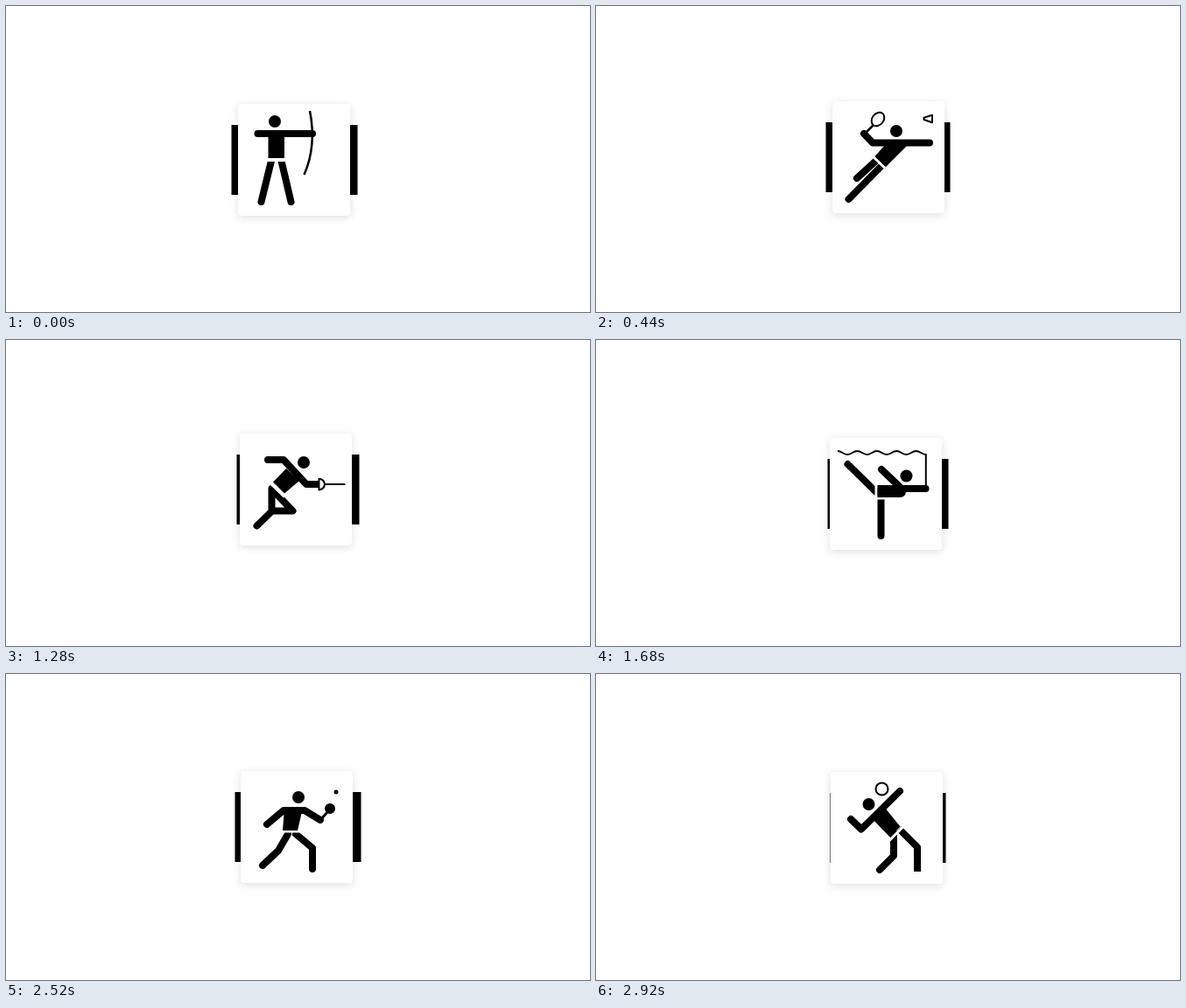
Recreate the animation shown at these times as an HTML page. Size 667x350 px, loop 3.32 s.

```html
<!DOCTYPE html>
<html lang="en">
<head>
<meta charset="utf-8">
<title>Sport pictograms</title>
<style>
  html, body { margin: 0; width: 100%; height: 100%; overflow: hidden; background: #fff; }
  svg { display: block; width: 100%; height: 100%; }
  #card { fill: #fff; filter: drop-shadow(0 2px 5px rgba(0, 0, 0, .13)); }
  #icon { stroke-linejoin: round; }
</style>
</head>
<body>
<svg viewBox="0 0 667 350">
  <rect id="bar" height="80"/>
  <rect id="card" width="128" height="128" rx="4"/>
  <g id="icon"></g>
</svg>
<script>
const line = (d, w = 8, cap = 'round', color = '#000') =>
  `<path d="${d}" fill="none" stroke="${color}" stroke-width="${w}" stroke-linecap="${cap}"/>`;
const thin = (d, w = 2) => line(d, w, 'butt');
const cut = (d, w = 3) => line(d, w, 'butt', '#fff');
const shape = d => `<path d="${d}Z"/>`;
const dot = (x, y, r = 7) => `<circle cx="${x}" cy="${y}" r="${r}"/>`;
const ring = (x, y, rx, ry = rx, turn = 0) =>
  `<ellipse cx="${x}" cy="${y}" rx="${rx}" ry="${ry}" transform="rotate(${turn} ${x} ${y})" fill="none" stroke="#000" stroke-width="2"/>`;

// Ribbon: alternating half waves, then the drop to the hand
function ribbon() {
  let d = 'M276 127';
  for (let i = 0; i < 9; i++) {
    const y = i % 2 ? -4 : 4;
    d += `c5 0 6.2 ${y} 11.2 ${y}`;
  }
  return thin(d) + thin('M376.8 130V168');
}

const archery =
  line('M304 173L291.5 224M313.5 173L325.5 224') + cut('M294 176H324', 4) +
  shape('M299.5 146H318V174H299.5') + line('M287.5 146H350') +
  dot(307, 132) + thin('M347 120Q355 160 340.5 193', 2.5);

const badminton =
  line('M322 175L298 197M327 182L288.5 221') + cut('M312 167.8L334 189.2') +
  shape('M330 159H356L331 184L318.5 172') + line('M306 146L316 156.5H381') +
  dot(343, 143) + ring(322, 129.5, 6.5, 8.5, 38) + thin('M317 136L306 147', 2.5) +
  thin('M384 124.8V133.2L374.5 130V127.6Z');

const basketball =
  line('M321 181L307 198L288 216M327 181L342 198L337 224') + cut('M310 178H340') +
  shape('M316 153H335L332 177H316') + line('M296 168L314 156H336L359 143') +
  dot(328, 141) + ring(364, 132, 6);

const fencing =
  line('M303.5 170V196L286.5 212.5M304 171L327.5 195.5H303.5') + cut('M299 161L318 179.5') +
  shape('M320 147L335 161L318 175.5L305 162.5') + line('M299 137H317L343 165H356') +
  dot(340, 140) +
  '<path d="M357.5 158.8V171.5C366 170 366 160 357.5 158.8Z" fill="#fff" stroke="#000" stroke-width="2"/>' +
  thin('M363 165H387.5');

const gymnastics =
  ribbon() + line('M287.5 142L320 174') + cut('M320 163V184') +
  line('M325.5 181V224') + cut('M319 181H332') +
  shape('M321.5 166H346L354 172Q354 180 347 180H321.5') +
  line('M326 148L349 170H376.5') + dot(354.5, 155.5);

const skateboard =
  line('M305 171L324.5 189V213.5M306 173H332L349.5 190') + cut('M298 167H338', 4) +
  shape('M321 145L338 156L328 165H302') + line('M302 132.5H321L347 160.5H363') +
  dot(342, 137) +
  thin('M323 221.5Q329 222.5 333 218.5L356 195.5Q360 191 359 186') +
  dot(337, 221, 2) + dot(358, 200, 2);

const tableTennis =
  line('M322 183L311 202L293 219M331 183L350 199V223') + cut('M310 180H343') +
  shape('M318 153H339L333 179H316') + line('M298 172L317 156H341L359 167') +
  dot(334, 141) + thin('M359 167L367 158', 3) + dot(370, 154, 6) + dot(377, 135, 2.5);

const volleyball =
  line('M340 182V208L324 224') + line('M346 177L367 198V226', 8, 'butt') +
  cut('M333 192.5L352 173.5') +
  shape('M316 166L330 153L347.5 174.5L335.5 186.5') + line('M291 166L303 177.5L347 134') +
  dot(311.5, 149) + ring(326.5, 131.5, 7);

// start time, card x and y, left and right end of the bar
const steps = [
  [0, 265, 112, 257.5, 401.5, archery],
  [440, 270, 109, 262.5, 404.5, badminton],
  [840, 269, 110, 264.5, 402.5, basketball],
  [1280, 267, 107, 263.5, 403.5, fencing],
  [1680, 267, 112, 264.5, 402.5, gymnastics],
  [2120, 269, 111, 260.5, 406.5, skateboard],
  [2520, 268, 111, 261.5, 405.5, tableTennis],
  [2920, 268, 112, 267.5, 399.5, volleyball]
];
const LOOP = 3320;
const [bar, card, icon] = ['bar', 'card', 'icon'].map(id => document.getElementById(id));
const set = (el, attrs) => Object.entries(attrs).forEach(([k, v]) => el.setAttribute(k, v));

let shown;
function draw(time) {
  const step = steps.findLast(s => s[0] <= time % LOOP);
  if (step === shown) return;
  shown = step;
  const [, x, y, left, right, art] = step;
  set(card, { x, y });
  set(bar, { x: left, y: y + 24, width: right - left });
  icon.innerHTML = art;
}

function tick(now) {
  draw(now);
  requestAnimationFrame(tick);
}
draw(0);
requestAnimationFrame(tick);
</script>
</body>
</html>
```
